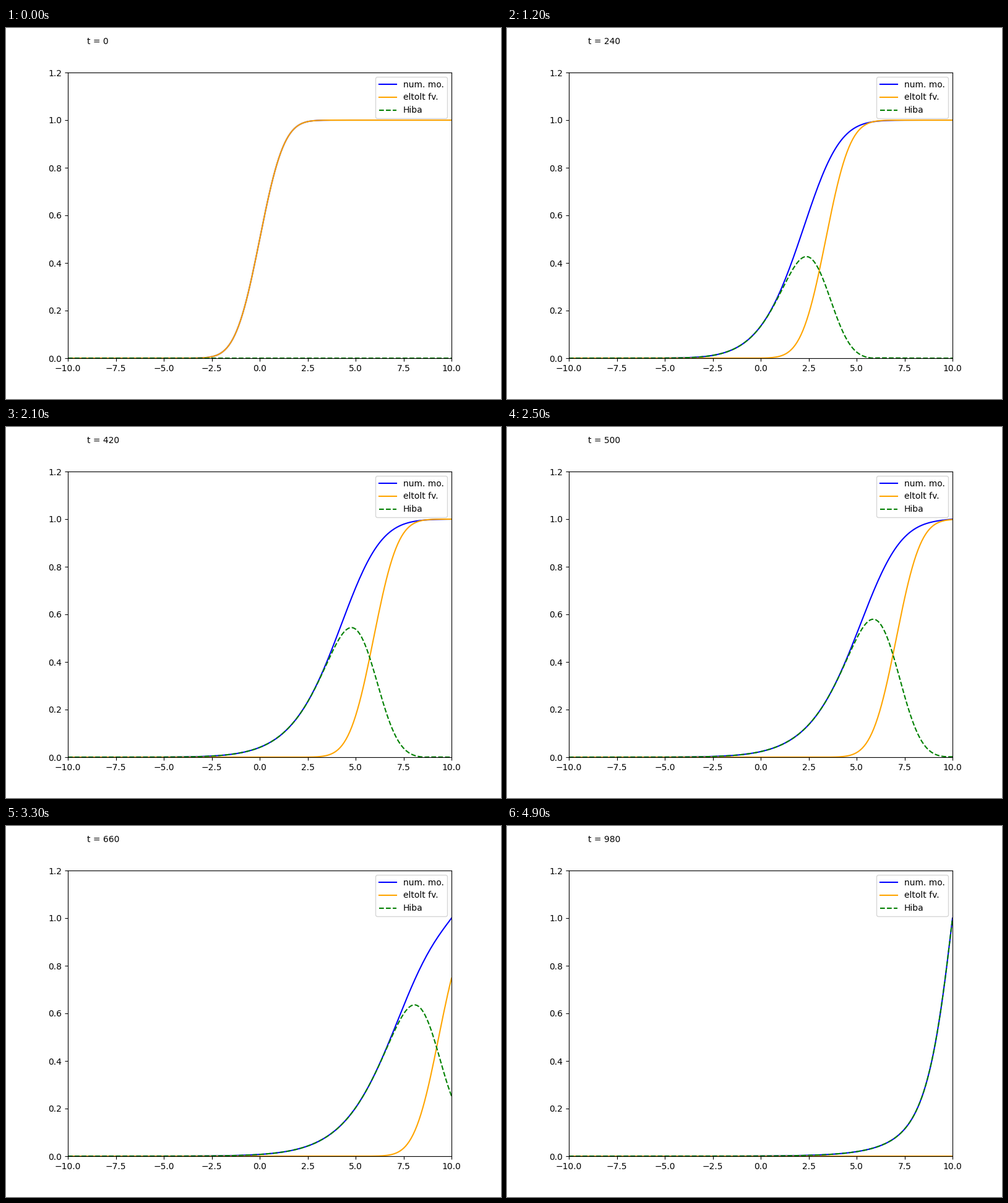
A matplotlib script that plays this animation: 800x600 px, repeating every 5000 ms.

```python
import math

import matplotlib.pyplot as plt
import numpy as np
from matplotlib.animation import FuncAnimation

FRAMES, INTERVAL = 50, 100
STEPS_PER_FRAME = 20
DT = 0.01
SPEED = math.sqrt(2)

x = np.linspace(-10, 10, 201)
dx = x[1] - x[0]


@np.vectorize
def normal_cdf(z):
    return 0.5 * (1 + math.erf(z / math.sqrt(2)))


def solve():
    """Explicit scheme for u_t = u_xx / 2 + u^2 - u with fixed ends."""
    u = normal_cdf(x)
    snapshots = []
    for step in range(FRAMES * STEPS_PER_FRAME):
        if step % STEPS_PER_FRAME == 0:
            snapshots.append(u.copy())
        mid = u[1:-1]
        diffusion = (u[2:] - 2 * mid + u[:-2]) / (2 * dx**2)
        u[1:-1] = mid + DT * (diffusion + mid**2 - mid)
    return snapshots


waves = solve()

fig, ax = plt.subplots(figsize=(8, 6), dpi=100)
ax.set_xlim(-10, 10)
ax.set_ylim(0, 1.2)
numeric, = ax.plot([], [], color="blue", label="num. mo.")
shifted, = ax.plot([], [], color="orange", label="eltolt fv.")
error, = ax.plot([], [], color="green", linestyle="--", label="Hiba")
ax.legend(loc="upper right")
clock = ax.text(-9, 1.32, "")


def update(frame):
    step = frame * STEPS_PER_FRAME
    front = normal_cdf(x - SPEED * DT * step)
    numeric.set_data(x, waves[frame])
    shifted.set_data(x, front)
    error.set_data(x, np.abs(waves[frame] - front))
    clock.set_text(f"t = {step}")
    return numeric, shifted, error, clock


anim = FuncAnimation(fig, update, frames=FRAMES, interval=INTERVAL, repeat=True)
plt.show()
```
